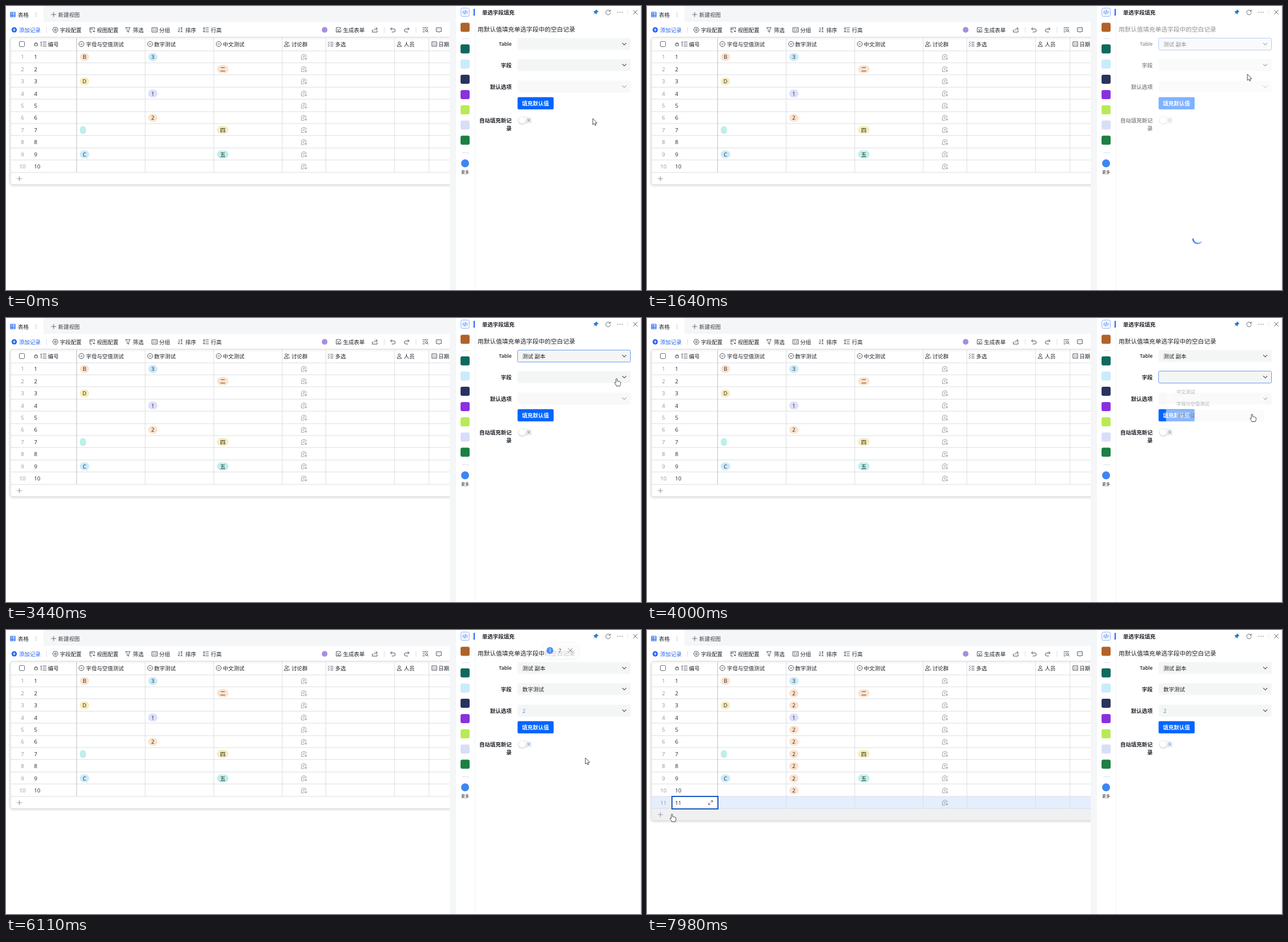
Animation of 1119 by 500 pixels, one loop 8000 ms. Source, as an HTML page with a canvas:

```html
<!DOCTYPE html>
<html lang="zh">
<head>
<meta charset="utf-8">
<title>单选字段填充</title>
<style>
html, body { margin: 0; width: 100%; height: 100%; overflow: hidden; background: #fff; }
canvas { display: block; width: 1119px; height: 500px; }
</style>
</head>
<body>
<canvas id="stage"></canvas>
<script>
const W = 1119, H = 500, LOOP = 8000;
const cv = document.getElementById('stage'), g = cv.getContext('2d');
const dpr = window.devicePixelRatio || 1;
cv.width = W * dpr; cv.height = H * dpr;

const FONT = '"Open Sans","Noto Sans CJK SC","Noto Sans CJK",sans-serif';
const INK = '#1f2329', GREY = '#646a73', PALE = '#8f959e', LINE = '#dcdee1', BLUE = '#1f63f0', BAR = '#f5f6f7';
const ORANGE = '#fde2cc', SKY = '#c9ebfc', YELLOW = '#f8ecbb', LILAC = '#dde0fb', TEAL = '#bdf0e8';

// Timeline in ms
const T = {
  table: [400, 1150], load: [1150, 3150], field: [3450, 3950], fieldSet: 4180,
  option: [4560, 5330], press: 5750, toast: [6020, 7680], fill: 6350, add: 7200
};
const PATH = [
  [0, 1034, 198], [90, 1034, 197], [320, 1076, 66], [560, 1076, 68], [850, 1060, 117], [1640, 1058, 120],
  [2100, 1062, 112], [2480, 1064, 122], [2960, 1085, 200], [3140, 1084, 190], [3390, 1076, 106],
  [3580, 1076, 108], [3880, 1067, 169], [4060, 1066, 169], [4480, 1078, 142], [4680, 1078, 144],
  [4920, 1073, 165], [5030, 1073, 165], [5260, 1070, 190], [5380, 1066, 190], [5680, 945, 172],
  [5830, 946, 173], [6110, 1021, 225], [6220, 1014, 230], [6670, 72, 324], [6850, 46, 305],
  [7560, 46, 305], [7850, 44, 324], [8000, 44, 324]
];
const HANDS = [[290, 1150], [3370, 5850], [6780, 8000]];

const clamp = v => Math.max(0, Math.min(1, v));
const within = (t, [a, b]) => t >= a && t < b;

function rect(x, y, w, h, fill, r = 0, stroke) {
  g.beginPath();
  g.roundRect(x, y, w, h, r);
  if (fill) { g.fillStyle = fill; g.fill(); }
  if (stroke) { g.strokeStyle = stroke; g.lineWidth = 1; g.stroke(); }
}
function disc(x, y, r, fill) {
  g.beginPath(); g.arc(x, y, r, 0, 7); g.fillStyle = fill; g.fill();
}
function text(s, x, y, color = INK, size = 9.5, weight = 400, align = 'left') {
  g.font = `${weight} ${size}px ${FONT}`;
  g.textAlign = align;
  g.fillStyle = color;
  g.fillText(s, x, y + size * 0.37);
}
function icon(d, x, y, color = GREY, width = 1) {
  g.save();
  g.translate(x, y);
  g.strokeStyle = color; g.lineWidth = width;
  g.lineCap = g.lineJoin = 'round';
  g.stroke(new Path2D(d));
  g.restore();
}
function shadow(alpha, blur) {
  g.shadowColor = `rgba(20,24,30,${alpha})`; g.shadowBlur = blur * dpr; g.shadowOffsetY = dpr;
}
function faded(alpha, draw) {
  g.save(); g.globalAlpha *= alpha; draw(); g.restore();
}
// White floating box; its shadow fades faster than its fill
function popup(x, y, w, h, alpha) {
  g.save();
  shadow(0.18 * alpha ** 3, 6);
  rect(x, y, w, h, '#fff', 3);
  g.restore();
}

const circle = r => `M${r} 0A${r} ${r} 0 1 1 ${-r} 0A${r} ${r} 0 1 1 ${r} 0`;
const I = {
  plus: 'M-4 0H4M0-4V4',
  grid: 'M-4-4H4V4H-4ZM-4-1H4M-4 1.6H4M-1-4V4',
  gear: 'M-2.3-4.2H2.3L4.7 0L2.3 4.2H-2.3L-4.7 0Z' + circle(1.6),
  view: 'M4-1V-4H-4V4H-1M-4-1.5H1M1.5 2.5H4.5M3 1V4',
  filter: 'M-4-4H4L1.3 0V4L-1.3 3V0Z',
  group: 'M-4.5-4H4.5V4H-4.5ZM-2.5-1.3H-1M1-1.3H2.5M-2.5 1.5H-1M1 1.5H2.5',
  sort: 'M-2-4V4L-4 2M1-4H3.5L1-1H3.5M1 4L2.3 1L3.6 4',
  height: 'M0-3.5H5M0 0H5M0 3.5H5M-3-4V4M-4.5-2.5L-3-4L-1.5-2.5M-4.5 2.5L-3 4L-1.5 2.5',
  form: 'M4 0V4H-4V-4H4M-2-1L0 1L4-3M-2 2.5H2',
  share: 'M-4.5 0V4H4V1M-2 1Q-2-2 4-2M2-4.5L4.3-2L2 .3',
  undo: 'M-2-4L-4.3-1.7L-2 .6M-4.3-1.7H1Q4-1.7 4 1Q4 3.8 1 3.8H-2',
  redo: 'M2-4L4.3-1.7L2 .6M4.3-1.7H-1Q-4-1.7-4 1Q-4 3.8-1 3.8H2',
  find: 'M-4.5-3.5H4.5M-4.5 0H-1.5M-4.5 3.5H-1.5M4 1A2 2 0 1 1 0 1A2 2 0 1 1 4 1M3.4 2.6L5 4.2',
  chat: 'M-4.3-3.7H4.3V3H1L0 4.4L-1 3H-4.3ZM-1.8-.4H-1.6M1.6-.4H1.8',
  lock: 'M-2.5-.5H2.5V3H-2.5ZM-1.5-.5V-2Q0-4 1.5-2V-.5',
  num: 'M-4-4V4M-1-3.5H5M-1 0H5M-1 3.5H5M-5-3L-4-4',
  single: circle(4.5) + 'M-1.8-.8L0 1L1.8-.8',
  people: 'M1-2A2 2 0 1 1-3-2A2 2 0 1 1 1-2M-4.8 4Q-4.8 1-1 1Q2.5 1 2.5 4ZM2.5-3.6Q4.4-2 2.5-.5M4 1.5Q5 2.5 5 4',
  list: 'M-4.5-3L-3.7-2.2L-2.2-4M-4.5 .2L-3.7 1L-2.2-.8M-4.5 3.4L-3.7 4.2L-2.2 2.4M0-3H4.5M0 .2H4.5M0 3.4H4.5',
  person: 'M2-2A2 2 0 1 1-2-2A2 2 0 1 1 2-2M-3.8 4Q-3.8 1 0 1Q3.8 1 3.8 4Z',
  date: 'M-4-4H4V4H-4ZM-2-1H-1M1-1H2M-2 1.6H-1M1 1.6H2',
  talk: 'M4.5-1Q4-4.5 0-4.5Q-4.5-4.5-4.5 0V4.3H0M-1.8-1.2H2M-1.8 1H0M3.2 .8V5M1.1 2.9H5.3',
  code: 'M-2-2.2L-4.2 0L-2 2.2M2-2.2L4.2 0L2 2.2M.7-3L-.7 3',
  refresh: 'M3.6-2A4.2 4.2 0 1 0 4.2 1M4-4.2V-1.7H1.5',
  close: 'M-3.5-3.5L3.5 3.5M3.5-3.5L-3.5 3.5',
  chevron: 'M-3.2-1.6L0 1.6L3.2-1.6',
  expand: 'M1-3.5H3.5V-1M3.5-3.5L.7-.7M-1 3.5H-3.5V1M-3.5 3.5L-.7 .7'
};

function toolbar() {
  rect(0, 0, 793, 500, BAR);
  rect(0, 0, 66, 29, '#fff');
  rect(0, 28, 782, 472, '#fff');
  icon(I.grid, 12, 15, BLUE, 1.2);
  text('表格', 21, 15);
  [-3, 0, 3].forEach(d => disc(53, 15 + d, 0.7, PALE));
  icon(I.plus, 84, 15);
  text('新建视图', 92, 15, '#3c4047');
  disc(14.5, 42, 4.7, BLUE);
  icon('M-2.3 0H2.3M0-2.3V2.3', 14.5, 42, '#fff');
  text('添加记录', 23, 42, BLUE);
  [['gear', 87, '字段配置', 95], ['view', 152, '视图配置', 160], ['filter', 215, '筛选', 223.5],
   ['group', 262, '分组', 270], ['sort', 307, '排序', 316], ['height', 352, '行高', 361],
   ['form', 586, '生成表单', 594]].forEach(([k, x, s, tx]) => {
    icon(I[k], x, 42, '#50555d'); text(s, tx, 42);
  });
  disc(561.5, 42, 5, '#a98be6');
  [['share', 650], ['undo', 682], ['redo', 706], ['find', 739], ['chat', 763]]
    .forEach(([k, x]) => icon(I[k], x, 42, '#50555d'));
  [71, 666, 722].forEach(x => rect(x, 37, 1, 10, LINE));
}

function tag(s, x, y, color) {
  const w = !s ? 11 : s > '一' ? 20 : 16.5;
  rect(x, y - 7, w, 14, color, 7);
  text(s, x + w / 2, y, INK, 9.5, 400, 'center');
}

function table(t, cy) {
  const added = t >= T.add, rows = added ? 11 : 10;
  const rowY = i => 79 + Math.floor(21.42 * i), mid = i => 89.8 + 21.42 * i;
  const end = rowY(rows), bottom = end + 22;
  g.save();
  g.beginPath(); g.rect(0, 50, 782, 300); g.clip();
  g.save();
  shadow(0.16, 4);
  rect(7.5, 55.5, 790, bottom - 56, '#fff', 4, LINE);
  g.restore();
  if (t > 6700 && cy > end) rect(8, end, 774, 21, '#eff0f1', [0, 0, 0, 4]);
  if (added) rect(8, rowY(10), 774, 22, '#e5eefd');

  for (let i = 0; i <= rows; i++) rect(8, rowY(i) - 0.5, 774, 1, LINE);
  [245, 366, 486.5, 563.5, 684.5, 745].forEach(x => rect(x - 0.3, 56, 1, end - 56, LINE));
  rect(124, 56, 1, end - 56, '#bdc0c5');

  rect(23.5, 62.5, 9, 9, '#fff', 1, GREY);
  [['lock', 53], ['num', 66, '编号', 74], ['single', 133, '字母与空值测试', 141], ['single', 254, '数字测试', 261],
   ['single', 375, '中文测试', 382], ['people', 495, '讨论群', 503], ['list', 572, '多选', 580],
   ['person', 693, '人员', 701], ['date', 755, '日期', 762]].forEach(([k, x, s, tx]) => {
    icon(I[k], x, 67, '#50555d');
    if (s) text(s, tx, 67);
  });

  const filled = { 0: ['3', SKY], 3: ['1', LILAC], 5: ['2', ORANGE] };
  for (let i = 0; i < rows; i++) {
    text(i + 1, 29, mid(i), PALE, 9.6, 400, 'center');
    if (i < 10) text(i + 1, 49.5, mid(i), INK, 9.6);
    icon(I.talk, 525, mid(i), PALE, 0.9);
    const cell = filled[i] || (t >= T.fill && i < 10 && ['2', ORANGE]);
    if (cell) tag(cell[0], 250.5, mid(i), cell[1]);
  }
  [['B', 0, ORANGE], ['D', 2, YELLOW], ['', 6, TEAL], ['C', 8, SKY]]
    .forEach(([s, i, c]) => tag(s, 130, mid(i), c));
  [['二', 1, ORANGE], ['四', 6, YELLOW], ['五', 8, TEAL]]
    .forEach(([s, i, c]) => tag(s, 372, mid(i), c));
  if (added) {
    rect(43, 292, 83, 24, '#1c55c4');
    rect(45, 294, 79, 20, '#fff');
    text('11', 49.5, mid(10), INK, 9.6);
    icon(I.expand, 112, 304, GREY);
  }
  icon(I.plus, 23.5, end + 11, PALE);
  g.restore();
}

function sidebar() {
  rect(793, 0, 326, 500, '#fff');
  rect(826, 22, 1, 478, '#f1f2f3');
  rect(1118, 0, 1, 500, '#e6e7e9');
  rect(801.5, 3.5, 15, 15, '#eef4ff', 3, '#9dbdf7');
  icon(I.code, 809, 11, BLUE, 0.9);
  ['#b0622a', '#0d6a5c', '#c9ecfb', '#29335f', '#8b30df', '#b8ea58', '#d9ddfa', '#1c8042']
    .forEach((c, i) => rect(801, i ? 67.5 + 26.8 * (i - 1) : 29.5, 16, 16, c, 3));
  [57, 258].forEach(y => rect(804, y, 12, 1, LINE));
  disc(809, 277, 7, '#3d86f5');
  text('更多', 809, 292, INK, 7, 400, 'center');

  rect(824, 5, 2, 12, BLUE);
  text('单选字段填充', 839, 11, INK, 9.5, 700);
  g.fillStyle = '#2c76d2';
  g.fill(new Path2D('M1040 6L1044 10L1042.5 10.6L1041 12.4L1040.6 15L1038 12.6L1034.8 15.4L1037.2 12L1035 9.4L1037.6 9L1039.4 7.4Z'));
  icon(I.refresh, 1061, 11);
  [-3.7, 0, 3.7].forEach(d => disc(1082 + d, 11, 0.8, GREY));
  rect(1095, 6, 1, 10, '#eceded');
  icon(I.close, 1109, 11);
}

function select(y, value, focus, disabled, color) {
  rect(901.5, y - 10.5, 199, 21, disabled ? '#f8f8f8' : '#f4f5f5', 2, focus ? '#6a9cf0' : null);
  if (value) text(value, 910, y, color);
  icon(I.chevron, 1089.5, y, disabled ? '#a9adb2' : '#4a4f57', 1.2);
}

function panel(t) {
  const tint = t >= T.option[1] ? '#5f86bd' : INK;
  text('用默认值填充单选字段中的空白记录', 831, 41.5, INK, 10.75);
  text('Table', 891, 67, INK, 8.8, 600, 'right');
  [['字段', 104], ['默认选项', 142], ['自动填充新记', 201], ['录', 215]]
    .forEach(([s, y]) => text(s, 891, y, INK, 9.5, 700, 'right'));
  select(67, t >= T.load[0] && '测试 副本', within(t, [T.table[0], T.field[0]]));
  select(104, t >= T.fieldSet && '数字测试', within(t, [T.field[0], T.fieldSet]));
  select(142, t >= T.option[1] && '2', within(t, [T.option[0], T.press]), t < T.fieldSet, tint);
  rect(901.5, 160.5, 63.5, 21.5, '#0065ff', 2);
  text('填充默认值', 933, 171.5, '#fff', 9.5, 700, 'center');
  rect(902, 194, 26, 14, '#f7f8f8', 7);
  g.save();
  shadow(0.25, 3);
  disc(909.5, 201, 6, '#fff');
  g.restore();
  text('关', 921, 201, t >= T.option[1] ? '#7d9cd0' : PALE, 8.2, 400, 'center');
}

function loading(t) {
  faded(0.5, () => rect(828, 25, 288, 200, '#fff'));
  const head = Math.PI + (t - 1640) / 600 * 2 * Math.PI, n = 24, span = 2.5;
  g.strokeStyle = '#0f65fa'; g.lineWidth = 2.6;
  for (let i = 0; i < n; i++) faded(1 - (i / n) ** 2 * 0.8, () => {
    const a = head - span * i / n;
    g.beginPath(); g.arc(970.5, 409.5, 8.4, a - span / n, a); g.stroke();
  });
}

function dropdown(t, [open, close], top, items, cy) {
  const p = t < close ? 1 - clamp((t - open) / 100) : clamp((t - close) / 100);
  if (t < open || p >= 0.77) return;
  const alpha = 1 - 1.3 * p, size = 1 - p / 4;
  faded(alpha, () => {
    g.translate(1001, top); g.scale(size, size); g.translate(-1001, -top);
    popup(902, top, 198.5, items.length * 24 + 6, alpha);
    const hover = Math.floor((cy - top - 1) / 24);
    items.forEach((s, i) => {
      const y = top + 3 + 24 * i;
      if (i === hover) rect(902, y, 198.5, 24, '#f3f4f4');
      text(s, 923, y + 12, INK, 9.5);
    });
  });
}

function toast(t) {
  const a = clamp((t - T.toast[0]) / 120) * (1 - clamp((t - T.toast[1]) / 120));
  if (!a) return;
  faded(a, () => {
    popup(948, 23, 60, 27, a);
    disc(958.5, 36, 6, '#1f6ff0');
    text('i', 958.5, 36, '#fff', 9, 700, 'center');
    text('7', 976, 36, INK, 9.5, 400, 'center');
    icon(I.close, 994.5, 36, '#4a4f57');
  });
}

function cursorAt(t) {
  const i = PATH.findIndex(k => k[0] > t), a = PATH[i - 1], b = PATH[i];
  const u = (t - a[0]) / (b[0] - a[0]), e = u * u * (3 - 2 * u);
  return [a[1] + (b[1] - a[1]) * e, a[2] + (b[2] - a[2]) * e];
}

const ARROW = new Path2D('M0 0V11L2.5 8.8L4 12.2L5.8 11.4L4.3 8.1H7.6Z');
const HAND = new Path2D('M-1.2 1Q0-.4 1.2 1V5Q2.4 4.2 3.2 5.2Q4.6 4.6 5.2 5.8Q7 5.4 7 7V9.5Q7 11 6 12.5V13.5H-.5V12.5L-3.6 8.2Q-3.6 6.4-1.2 7.6Z');
function cursor(t, x, y) {
  g.save();
  g.translate(x, y);
  const shape = HANDS.some(s => within(t, s)) ? HAND : ARROW;
  g.fillStyle = '#fff'; g.fill(shape);
  g.strokeStyle = '#33363b'; g.lineWidth = 0.9; g.lineJoin = 'round'; g.stroke(shape);
  g.restore();
}

function draw(t) {
  const [x, y] = cursorAt(t);
  g.setTransform(dpr, 0, 0, dpr, 0, 0);
  toolbar();
  table(t, y);
  sidebar();
  panel(t);
  if (within(t, T.load)) loading(t);
  dropdown(t, T.table, 80, ['测试', '测试 副本'], y);
  dropdown(t, T.field, 117, ['中文测试', '字母与空值测试', '数字测试'], y);
  dropdown(t, T.option, 155, ['1', '2', '3', '4', '5'], y);
  toast(t);
  cursor(t, x, y);
}

const start = performance.now();
(function frame() {
  draw((performance.now() - start) % LOOP);
  requestAnimationFrame(frame);
})();
</script>
</body>
</html>
```
